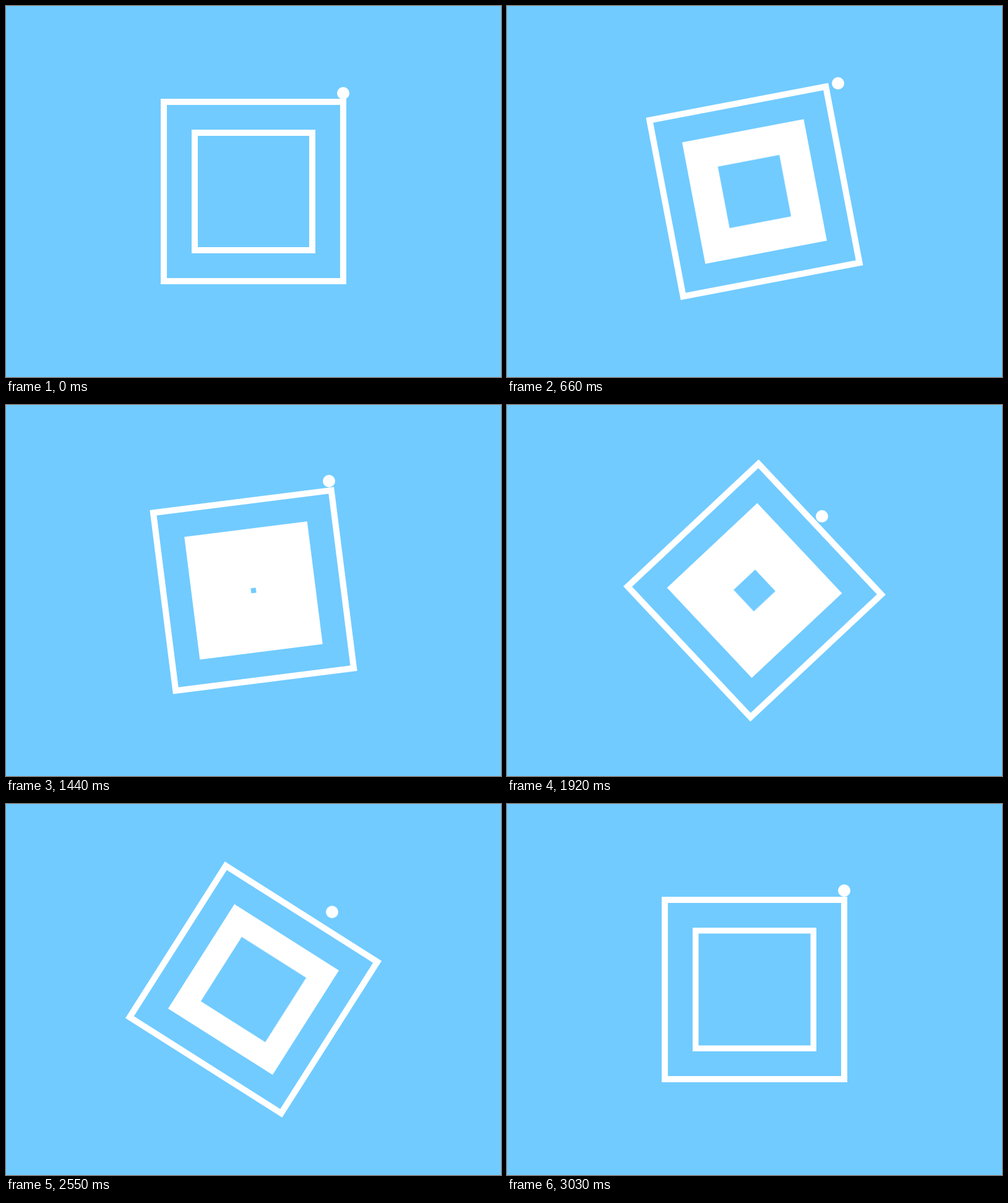
Recreate the animation shown at these times as an HTML page without scripts. Size 800 by 600 pixels, loop 3060 ms.

```html
<!DOCTYPE html>
<html lang="en">
<head>
<meta charset="utf-8">
<title>Turning square</title>
<style>
  :root { --sky: #71cbff; --loop: 3060ms; }
  html, body { margin: 0; width: 100%; height: 100%; overflow: hidden; background: var(--sky); }
  svg { display: block; width: 800px; height: 600px; }

  /* each half turn has 51 poses, both ends included */
  .turn, .hole, .ball { animation: var(--loop) -2ms infinite; }
  .turn { animation-name: turn; animation-duration: calc(var(--loop) / 2); }
  .turn, .hole { animation-timing-function: steps(51, jump-none); }
  .hole { animation-name: hole; }
  .ball { animation-name: ball; }

  @keyframes turn {
    from { transform: rotate(0deg); }
    to { transform: rotate(180deg); }
  }
  @keyframes hole {
    0% { transform: scale(180); }
    50% { transform: scale(1); }
    100% { transform: scale(181); }
  }
  /* straight hops between contact points, 30 ms per step */
  @keyframes ball {
    0% { transform: translate(145px, -159px); animation-timing-function: steps(13); }
    12.7451% { transform: translate(109px, -120px); animation-timing-function: steps(9); }
    21.5686% { transform: translate(135px, -175px); animation-timing-function: steps(3); }
    24.5098% { transform: translate(145px, -160px); animation-timing-function: steps(13); }
    37.2549% { transform: translate(109px, -120px); animation-timing-function: steps(10); }
    47.0588% { transform: translate(122px, -177px); animation-timing-function: steps(2); }
    49.0196% { transform: translate(145px, -160px); animation-timing-function: steps(1); }
    50% { transform: translate(145px, -159px); animation-timing-function: steps(13); }
    62.7451% { transform: translate(109px, -120px); animation-timing-function: steps(9); }
    71.5686% { transform: translate(135px, -175px); animation-timing-function: steps(3); }
    74.5098% { transform: translate(145px, -160px); animation-timing-function: steps(13); }
    87.2549% { transform: translate(119px, -110px); animation-timing-function: steps(9); }
    96.0784% { transform: translate(135px, -175px); animation-timing-function: steps(3); }
    99.0196% { transform: translate(145px, -160px); animation-timing-function: steps(1); }
    100% { transform: translate(145px, -159px); }
  }
</style>
</head>
<body>
<svg viewBox="-400 -300 800 600" fill="#fff">
  <g class="turn">
    <rect x="-145" y="-145" width="290" height="290" fill="none" stroke="#fff" stroke-width="10"/>
    <rect x="-100" y="-100" width="200" height="200"/>
    <rect class="hole" x="-.5" y="-.5" width="1" height="1" fill="var(--sky)"/>
  </g>
  <circle class="ball" r="10"/>
</svg>
</body>
</html>
```
